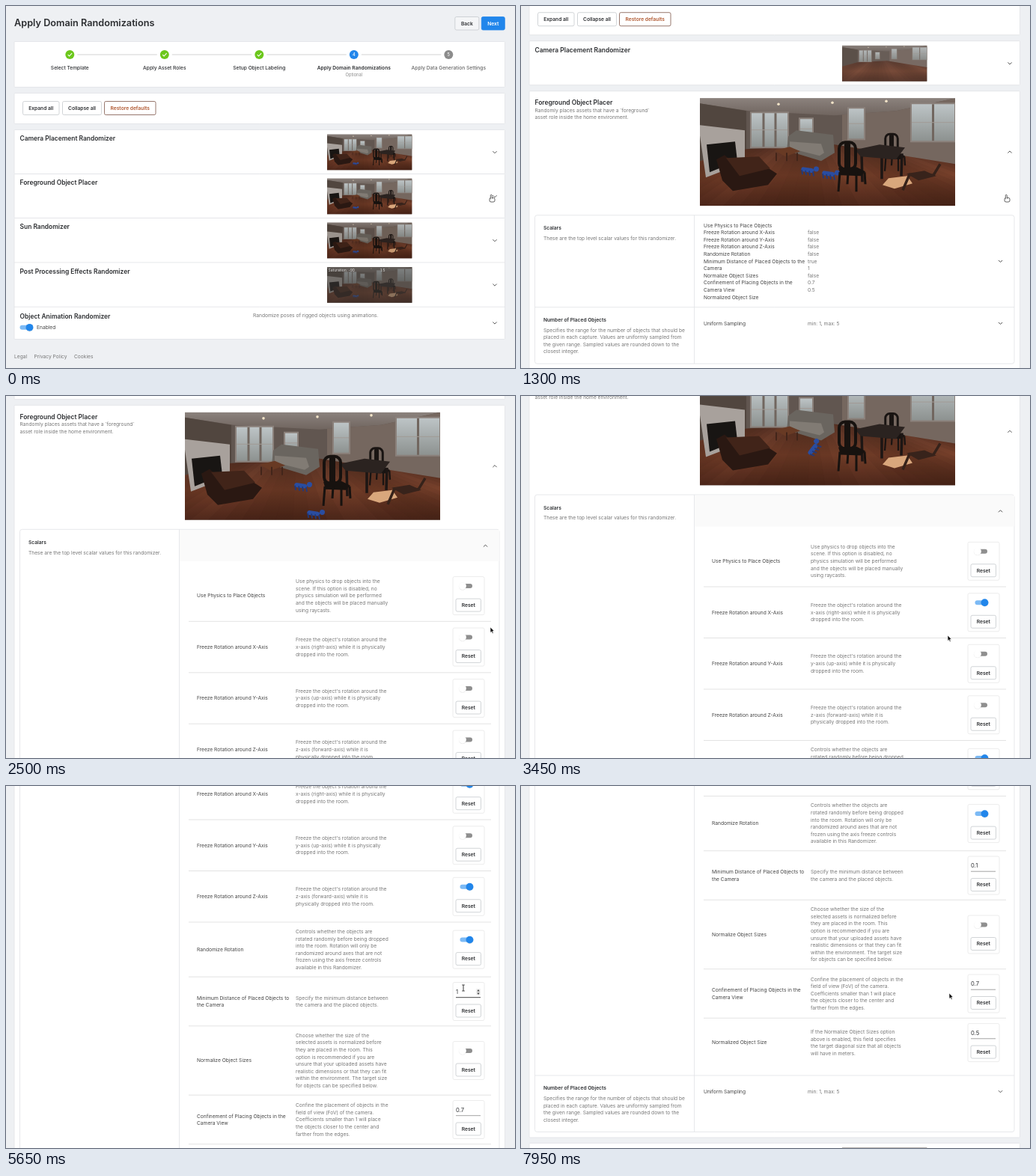
Write an HTML page with a canvas that moves like this. It is 680x484 px and loops after 8000 ms.

```html
<!DOCTYPE html>
<html lang="en">
<head>
<meta charset="utf-8">
<title>Domain randomization settings</title>
<style>
html, body { margin: 0; width: 100%; height: 100%; overflow: hidden; background: #eef0f3; }
canvas { display: block; width: 680px; height: 484px; }
</style>
</head>
<body>
<canvas id="stage"></canvas>
<script>
const W = 680, H = 484, LOOP = 8000;
const canvas = document.getElementById('stage');
const ctx = canvas.getContext('2d');
const dpr = window.devicePixelRatio || 1;
canvas.width = W * dpr;
canvas.height = H * dpr;

const INK = '#2c2e31', LABEL = '#444', GRAY = '#777', EDGE = '#e1e3e6', RIM = '#c6c9cd', BLUE = '#2186eb';
const SIZE = 6.65, LEAD = 9.6, ROW = 59.4;

// Motion
const lerp = (a, b, k) => a + (b - a) * k;
const ease = (t, start, span) => {
  const x = Math.max(0, Math.min(1, (t - start) / span));
  return x * x * (3 - 2 * x);
};
// Each stop is [arrival time, value...]; the move there takes `span`.
const glide = (t, stops, span, i = 1) =>
  stops.reduce((v, s) => lerp(v, s[i], ease(t, s[0] - span, span)), stops[0][i]);

const SCROLL = [0, 147.5, 266.5, 384, 545, 713.5].map((y, i) => [150 + 1250 * i + (i === 5 ? 1100 : 0), y]);
const POINTER = [
  [0, 649, 254, hand], [1550, 645, 308, hand], [1850, 647, 309, arrow],
  [2980, 616, 275, hand], [3380, 570, 320, arrow], [4120, 616, 294, hand],
  [4540, 566, 327, arrow], [5550, 611, 270, beam], [7050, 572, 277, arrow]
];

// Drawing helpers
function font(size, weight) {
  ctx.font = `${weight} ${size}px Inter, sans-serif`;
}
function text(s, x, y, color = INK, size = SIZE, weight = 400, align = 'left') {
  font(size, weight);
  ctx.fillStyle = color;
  ctx.textAlign = align;
  ctx.fillText(s, x, y + size * 0.35);
}
const bold = (s, x, y, size = SIZE, color = INK, align = 'left') => text(s, x, y, color, size, 600, align);
function lines(list, x, mid, color) {
  list.forEach((s, i) => text(s, x, mid + (i - (list.length - 1) / 2) * LEAD, color));
}
function wrap(s, width) {
  font(SIZE, 400);
  return s.split(' ').reduce((out, word) => {
    const last = out[out.length - 1], next = last ? `${last} ${word}` : word;
    if (!last || ctx.measureText(next).width > width) out.push(word);
    else out[out.length - 1] = next;
    return out;
  }, []);
}
function box(x, y, w, h, r, fill, stroke, width = 0.8) {
  ctx.beginPath();
  ctx.roundRect(x, y, w, h, r);
  if (fill) { ctx.fillStyle = fill; ctx.fill(); }
  if (stroke) { ctx.strokeStyle = stroke; ctx.lineWidth = width; ctx.stroke(); }
}
function trace(v) {
  ctx.beginPath();
  for (let i = 0; i < v.length; i += 2) ctx.lineTo(v[i], v[i + 1]);
}
function path(color, width, ...v) {
  trace(v);
  ctx.strokeStyle = color;
  ctx.lineWidth = width;
  ctx.stroke();
}
function poly(color, ...v) {
  trace(v);
  ctx.closePath();
  ctx.fillStyle = color;
  ctx.fill();
}
function disc(x, y, r, color) {
  ctx.beginPath();
  ctx.arc(x, y, r, 0, 7);
  ctx.fillStyle = color;
  ctx.fill();
}
function at(x, y, scale, draw) {
  ctx.save();
  ctx.translate(x, y);
  ctx.scale(scale, scale);
  draw();
  ctx.restore();
}
function clipped(x, y, w, h, draw) {
  ctx.save();
  ctx.beginPath();
  ctx.rect(x, y, w, h);
  ctx.clip();
  draw();
  ctx.restore();
}
function fade(top, bottom, ...colors) {
  const g = ctx.createLinearGradient(0, top, 0, bottom);
  colors.forEach((c, i) => g.addColorStop(i / (colors.length - 1), c));
  return g;
}

// Interface parts
const card = (y, bottom) => box(11, y, 655.5, bottom - y, 1, '#fff', EDGE);
function button(s, x, y, w, h, fill = '#fff', rim = RIM, color = INK) {
  box(x, y, w, h, 2, fill, rim);
  bold(s, x + w / 2, y + h / 2, SIZE, color, 'center');
}
function chevron(x, y, turn = 0) {
  const d = lerp(1.3, -1.3, turn);
  path('#555', 1, x - 2.6, y - d, x, y + d, x + 2.6, y - d);
}
function toggle(x, y, on) {
  box(x, y - 3, 16.5, 6, 3, on > 0.5 ? '#7cbaf5' : '#8f8f8f');
  const knob = x + lerp(3.5, 13, on);
  disc(knob, y + 0.4, 5.2, 'rgba(0,0,0,.08)');
  disc(knob, y, 4.9, on > 0.5 ? BLUE : '#fff');
}

// Living room in a 341 x 144 space
const DOGS = [[[112, 118]], [[144, 97], [172, 102]], [[155, 99], [172, 136]], [[152, 96]]];

function dog(x, y, turn) {
  ctx.save();
  ctx.translate(x, y);
  ctx.rotate(turn);
  box(-9, -4, 17, 6, 3, '#2a4da0');
  disc(11, -4, 3.5, '#2a4da0');
  for (let i = -8; i < 9; i += 5) path('#20397c', 1.8, i, 0, i + 2, 6);
  ctx.restore();
}
function glass(x, y, w, h, panes) {
  box(x - 2, y - 2, w + 4, h + 4, 0, '#8b817b');
  box(x, y, w, h, 0, fade(y, y + h, '#bdc4c6', '#8d9290'));
  for (let i = 1; i < panes; i++) path('#71665f', 3, x + w * i / panes, y, x + w * i / panes, y + h);
  path('#a19a95', 1, x, y + h / 2, x + w, y + h / 2);
}
function chair(x, y, scale, color) {
  at(x, y, scale, () => {
    box(1, 0, 22, 36, 8, null, color, 4);
    box(8, 1, 8, 34, 2, color);
    poly(color, 0, 34, 24, 33, 36, 39, 30, 45, 3, 44);
    for (let i = 0; i < 4; i++) path(color, 3, i * 11 + 2, 40, i * 12, 66 - i % 2 * 10);
  });
}
function floor() {
  trace([0, 84, 62, 68, 180, 62, 341, 88, 341, 144, 0, 144]);
  ctx.save();
  ctx.fillStyle = fade(62, 144, '#5b3527', '#78412b', '#4f281b');
  ctx.fill();
  ctx.clip();
  for (let i = -14; i < 25; i++) {
    const tone = Math.abs(Math.sin(i * 12.9)) * 0.22;
    poly(`rgba(30,10,4,${tone})`, 150, 30, i * 24, 150, i * 24 + 24, 150);
  }
  ctx.restore();
}
function shell() {
  box(0, 0, 341, 144, 0, '#615650');
  poly(fade(0, 23, '#8b827d', '#70655f'), 0, 0, 341, 0, 262, 17, 180, 23, 65, 17, 0, 7);
  poly('#75675f', 190, 22, 262, 17, 341, 0, 341, 90, 190, 66);
  poly('#51463f', 0, 7, 62, 17, 62, 72, 0, 86);
  floor();
  glass(69, 20, 48, 45, 3);
  glass(134, 28, 16, 26, 1);
  glass(199, 14, 20, 40, 1);
  glass(283, 8, 57, 49, 2);
  for (let i = 0; i < 3; i++) disc(105 + 72 * i, 8 - 2 * i, 1.8, '#f3e4c8');
}
function furniture(n) {
  // fireplace
  poly('#a8a19c', 0, 36, 60, 43, 60, 86, 8, 106, 0, 50);
  poly('#181513', 9, 62, 47, 58, 50, 84, 13, 99);
  // sofa and coffee table
  poly('#6a655f', 118, 51, 129, 43, 178, 49, 180, 73, 162, 84, 116, 70);
  poly('#817b74', 120, 58, 162, 61, 166, 73, 160, 77, 120, 67);
  poly('#683a24', 100, 70, 120, 65, 134, 71, 114, 78);
  for (let i = 0; i < 3; i++) path('#42251a', 2, 102 + 14 * i, 73, 102 + 14 * i, 84);
  // armchair
  poly('#2a1812', 22, 82, 33, 76, 51, 92, 86, 90, 103, 101, 91, 116, 44, 124, 30, 110);
  poly('#412419', 35, 80, 79, 78, 94, 94, 53, 104);
  poly('#d9a77c', 252, 107, 277, 104, 284, 114, 260, 121, 244, 116);
  DOGS[n].forEach(([x, y]) => dog(x, y, n === 3 ? -0.9 : 0.15));
  // dining set
  chair(247, 48, 0.75, '#191412');
  for (let i = 0; i < 3; i++) path('#1d1614', 3.5, 216 + 27 * i, 74, 217 + 26 * i, 112 - 4 * i);
  poly('#2b2320', 207, 69, 240, 62, 274, 66, 262, 82, 215, 78);
  chair(185, 59, 1, '#17120f');
  path('#35221a', 3.5, 321, 88, 312, 103, 280, 102, 271, 123);
  poly('#38231b', 276, 101, 300, 97, 316, 104, 292, 110);
}
function picture(x, y, w, n, bare) {
  clipped(x, y, w, w * 144 / 341, () => at(x, y, w / 341, () => {
    shell();
    if (!bare) furniture(n);
  }));
}

// Settings: label, description, toggle key or number
const ROWS = [
  ['Use Physics to Place Objects', 'Use physics to drop objects into the|scene. If this option is disabled, no|physics simulation will be performed|and the objects will be placed manually|using raycasts.', 'off'],
  ...['right-axis) while it is physically|dropped', 'up-axis) while it is physically|dropped', 'forward-axis) while it is|physically dropped'].map((s, i) => [
    `Freeze Rotation around ${'XYZ'[i]}-Axis`,
    `Freeze the object's rotation around the|${'xyz'[i]}-axis (${s} into the room.`, 'XYZ'[i]]),
  ['Randomize Rotation', 'Controls whether the objects are|rotated randomly before being dropped|into the room. Rotation will only be|randomized around axes that are not|frozen using the axis freeze controls|available in this Randomizer.', 'on'],
  ['Minimum Distance of Placed Objects to the Camera', 'Specify the minimum distance between|the camera and the placed objects.', 'distance'],
  ['Normalize Object Sizes', 'Choose whether the size of the|selected assets is normalized before|they are placed in the room. This|option is recommended if you are|unsure that your uploaded assets have|realistic dimensions or that they can fit|within the environment. The target size|for objects can be specified below.', 'off'],
  ['Confinement of Placing Objects in the Camera View', 'Confine the placement of objects in the|field of view (FoV) of the camera.|Coefficients smaller than 1 will place|the objects closer to the center and|farther from the edges.', '0.7'],
  ['Normalized Object Size', 'If the Normalize Object Sizes option|above is enabled, this field specifies|the target diagonal size that all objects|will have in meters.', '0.5']
].map(([label, about, key]) => ({ label, about: about.split('|'), key }));

const SWITCHES = { off: () => 0, on: () => 1, X: t => ease(t, 3050, 150), Y: () => 0, Z: t => ease(t, 4200, 150) };

function typed(t) {
  return t < 6050 ? '1' : '0.1'.slice(0, Math.floor((t - 6050) / 150));
}
function numberField(value, y, hot) {
  text(value, 601, y - 13, INK, 7.6);
  path(hot ? '#333' : '#999', 0.9, 601, y - 5.3, 634, y - 5.3);
  if (!hot) return;
  box(628, y - 17, 6, 9, 1, '#eee');
  for (const d of [-1, 1]) poly('#444', 629.3, y - 12.5 + d, 631, y - 12.5 + 3.5 * d, 632.7, y - 12.5 + d);
}
function control(key, y, t) {
  box(597, y - 25.5, 42, 51, 2, null, '#e8e8e8');
  if (SWITCHES[key]) toggle(606.5, y - 13, SWITCHES[key](t));
  else if (key === 'distance') numberField(typed(t), y, t > 5500 && t < 6900);
  else numberField(key, y);
  button('Reset', 601, y + 4, 33.5, 17);
}

function summary() {
  lines(ROWS.flatMap(r => wrap(r.label, 139)), 244, 460, LABEL);
  lines(['false', 'false', 'false', 'false', 'true', '1', 'false', '0.7', '0.5'], 383, 460, GRAY);
}
function details(t) {
  box(232, 399, 427, 42, 0, '#fafafa');
  let y = 453;
  ROWS.forEach(({ label, about, key }, i) => {
    const h = Math.max(SWITCHES[key] ? 68.5 : 65.6, about.length * LEAD + 15.6), mid = y + h / 2;
    lines(wrap(label, 127), 255, mid, LABEL);
    lines(about, 387, mid, GRAY);
    control(key, mid, t);
    y += h;
    if (i < ROWS.length - 1) path('#dcdcdc', 0.8, 244, y, 648, y);
  });
}

function scalars(t, open, bottom) {
  const end = bottom + 75.5;
  box(18.5, 398.5, 640.5, end - 398.5, 3, '#fff', EDGE);
  bold('Scalars', 30, 415.8);
  text('These are the top level scalar values for this randomizer.', 30, 429.5, GRAY);
  clipped(232, 399, 427, bottom - 399, () => {
    ctx.globalAlpha = 1 - open;
    summary();
    ctx.globalAlpha = open;
    details(t);
  });
  const y = lerp(460, 420.5, open);
  if (t > 1600 && t < 2300) disc(640.5, y, 8.5, '#f0f0f0');
  chevron(640.5, y, open);

  path(EDGE, 0.8, 18.5, bottom, 659, bottom);
  path(EDGE, 0.8, 231.5, 398.5, 231.5, end);
  bold('Number of Placed Objects', 30, bottom + 17);
  lines(['Specifies the range for the number of objects that should be', 'placed in each capture. Values are uniformly sampled from',
    'the given range. Sampled values are rounded down to the', 'closest integer.'], 30, bottom + 45, GRAY);
  text('Uniform Sampling', 244, bottom + 21.5, LABEL);
  text('min: 1, max: 5', 383, bottom + 21.5, GRAY);
  chevron(640.5, bottom + 21.5);
}

function header() {
  bold('Apply Domain Randomizations', 11, 23, 12.7);
  button('Back', 599.8, 14.5, 32, 17.5, '#f4f5f7');
  button('Next', 635.3, 14.5, 31, 17.5, BLUE, BLUE, '#fff');

  card(47.5, 108.5);
  ['Select Template', 'Apply Asset Roles', 'Setup Object Labeling', 'Apply Domain Randomizations',
    'Apply Data Generation Settings'].forEach((s, i) => {
    const x = 85.3 + i * 126.5;
    if (i < 4) path('#c8c8c8', 0.8, x + 10, 65, x + 116.5, 65);
    disc(x, 65, 6, i < 3 ? '#6cc71c' : i === 3 ? BLUE : '#8c8c8c');
    if (i < 3) path('#fff', 1.1, x - 2.6, 65.2, x - 0.7, 67, x + 2.8, 63.2);
    else text(String(i + 1), x, 65, '#fff', 5.6, 500, 'center');
    text(s, x, 83, i < 4 ? INK : '#666', SIZE, i === 3 ? 600 : 500, 'center');
  });
  text('Optional', 464.8, 92.3, '#888', 5.7, 400, 'center');

  card(116.5, 157.5);
  button('Expand all', 22.5, 127.5, 48.5, 18);
  button('Collapse all', 75.5, 127.5, 52, 18);
  button('Restore defaults', 131.5, 127.5, 68.5, 18, '#fff', '#7d5548', '#b0562e');
}

const rowTitle = (s, y) => bold(s, 18.5, y, 8.43);

function listRow(title, top, n, bare, shade) {
  rowTitle(title, top + 12);
  picture(429, top + 6, 113.5, n, bare);
  if (shade) box(429, top + 6, 113.5, 48, 0, shade);
  chevron(653, top + 30);
}

function footer(top, n) {
  const post = top + ROW, anim = top + 2 * ROW;
  card(top, top + 162);
  for (const y of [post, anim]) path(EDGE, 0.8, 11, y, 666.5, y);
  listRow('Sun Randomizer', top, 0, false, n % 2 ? 'rgba(255,190,120,.1)' : 'rgba(40,20,10,.1)');
  listRow('Post Processing Effects Randomizer', post, 0, false, 'rgba(62,60,58,.5)');
  text('Saturation: -90', 430.5, post + 10, '#ddd', 5);
  text('1.5', 500, post + 10, '#ddd', 5);
  rowTitle('Object Animation Randomizer', anim + 12.5);
  text('Randomize poses of rigged objects using animations.', 330, anim + 11.5, GRAY);
  toggle(18.5, anim + 27.5, 1);
  text('Enabled', 41, anim + 27.5, LABEL);
  chevron(653, anim + 21.5);
  text('Legal', 11, top + 185.5, GRAY);
  text('Privacy Policy', 37.5, top + 185.5, GRAY);
  text('Cookies', 91, top + 185.5, GRAY);
}

function page(t) {
  const grow = ease(t, 400, 300), open = ease(t, 1620, 230);
  const n = Math.floor((t + 200) / 1000) % 4;
  header();

  card(165.5, 224.5);
  listRow('Camera Placement Randomizer', 165.5, 0, n === 1, n === 1 && 'rgba(130,122,115,.2)');

  const top = 224.5 + 8 * grow, split = 521.5 + 579 * open;
  const bottom = lerp(283.5, split + 83, grow);
  card(top, bottom);
  clipped(11, top, 655.5, bottom - top, () => {
    if (!grow) return listRow('Foreground Object Placer', top, n);
    rowTitle('Foreground Object Placer', lerp(237, 248, grow));
    text('Randomly places assets that have a `foreground`', 18.5, 258, GRAY);
    text('asset role inside the home environment.', 18.5, 267.7, GRAY);
    picture(239, 242, 341, n);
    scalars(t, open, split);
    chevron(653, lerp(254, 314, grow), grow);
  });
  footer(bottom + 7.5 * grow, n);
}

// Pointer shapes
function hand() {
  box(-3, 2.4, 7, 5.6, 2, '#fff', '#222', 0.7);
  box(-1.7, -1.6, 2, 6, 1, '#fff', '#222', 0.7);
  box(-1.3, 3, 1.3, 2, 0, '#fff');
}
function beam() {
  path('#222', 0.9, 0, -4, 0, 4);
  for (const y of [-4, 4]) path('#222', 0.8, -1.8, y, 1.8, y);
}
function arrow() {
  poly('#111', 0, 0, 0, 7.4, 1.7, 5.9, 2.9, 8.6, 4.2, 8, 3, 5.4, 5.2, 5.3);
  ctx.strokeStyle = '#fff';
  ctx.lineWidth = 0.6;
  ctx.stroke();
}
function pointer(t) {
  const shape = POINTER.filter(stop => stop[0] - 60 <= t).pop()[3];
  at(glide(t, POINTER, 230, 1), glide(t, POINTER, 230, 2), 1, shape);
}

const start = performance.now();
function frame() {
  const t = (performance.now() - start) % LOOP;
  ctx.setTransform(dpr, 0, 0, dpr, 0, 0);
  box(0, 0, W, H, 0, '#eef0f3');
  at(0, -glide(t, SCROLL, 350), 1, () => page(t));
  pointer(t);
  requestAnimationFrame(frame);
}
requestAnimationFrame(frame);
</script>
</body>
</html>
```
